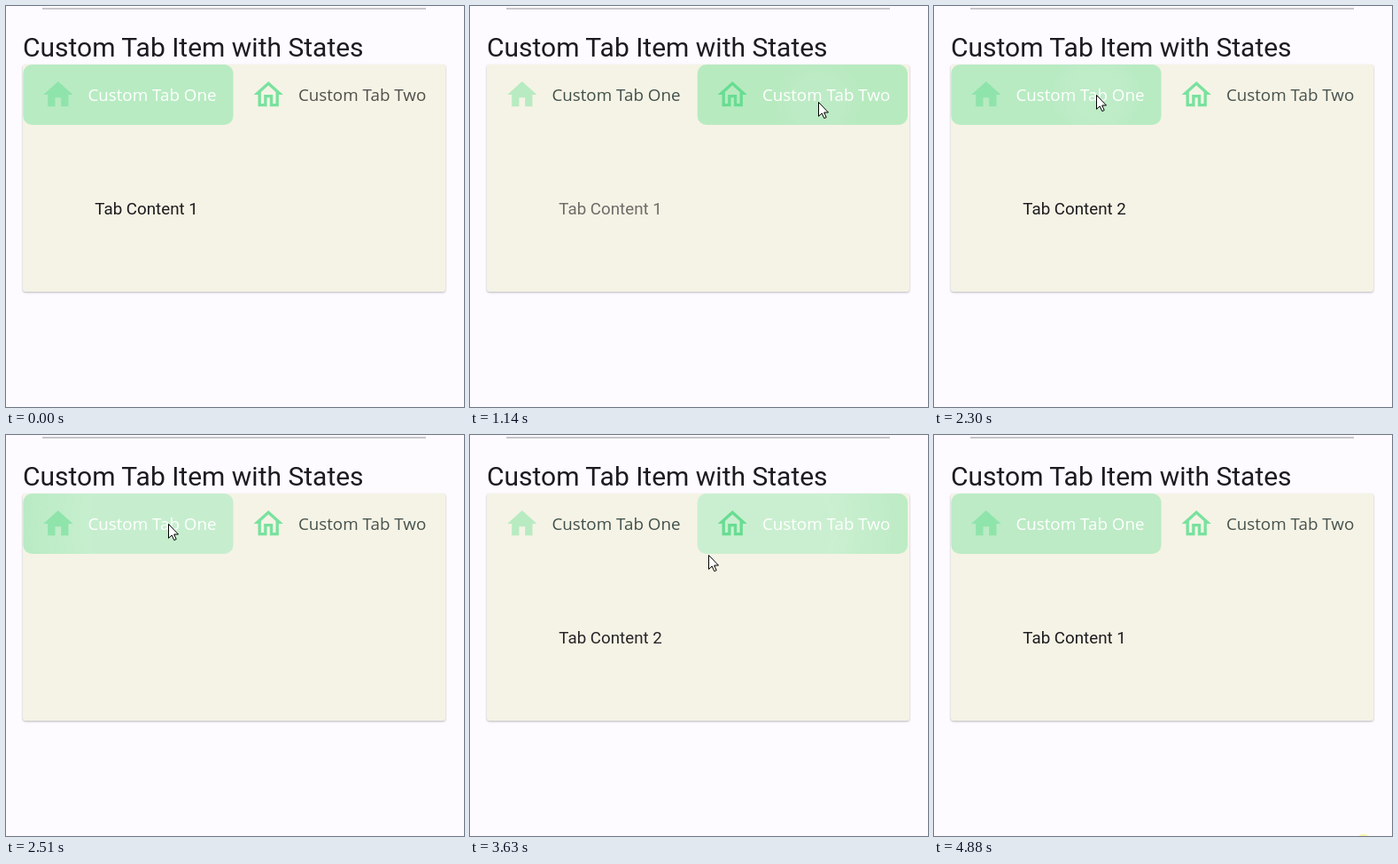
An HTML page that plays this animation: 517x452 px, repeating every 5020 ms.

```html
<!DOCTYPE html>
<html lang="en">
<head>
<meta charset="utf-8">
<title>Custom Tab Item with States</title>
<style>
html, body { margin: 0; width: 100%; height: 100%; overflow: hidden; background: #fdfbff; }
svg { display: block; width: 517px; height: 452px; }
svg * { animation: 5020ms linear infinite; }
.title { font: 30px Roboto, sans-serif; fill: #1c1b1f; }
.content { font: 18.75px Roboto, sans-serif; fill: #1c1b1f; }
.label { font: 18.8px "Open Sans", sans-serif; }
.card { fill: #f5f3e5; filter: drop-shadow(0 1.5px 1.2px rgba(0, 0, 0, .27)); }

/* Each ripple starts at its click time; the delay is click time minus loop length. */
.ripple { fill: url(#glow); transform-box: fill-box; transform-origin: center; animation-name: ripple; }

#bg1 { animation-name: bg1; }
#bg2 { animation-name: bg2; }
#icon1 { animation-name: icon1; }
#icon2 { animation-name: icon2; }
#label1 { animation-name: label1; }
#label2 { animation-name: label2; }
#content1 { animation-name: content1; }
#content2 { animation-name: content2; }
#cursor { animation-name: move; }
#pointer { animation-name: present; animation-timing-function: step-end; }
#halo { animation-name: halo; animation-timing-function: step-end; }

@keyframes ripple {
  0% { opacity: 0; transform: scale(.1); }
  2% { opacity: .6; }
  5.5% { opacity: 1; transform: scale(1); }
  8.3%, 100% { opacity: 0; transform: scale(1.2); }
}
@keyframes bg1 {
  0%, 18.73% { fill: #b8ebc2; }
  21.5%, 43.23% { fill: #b8ebc200; }
  45.5%, 66.7% { fill: #b8ebc2; }
  69.5%, 79.3% { fill: #b8ebc200; }
  82% { fill: #b8ebc2; }
  86.25%, 100% { fill: #bcebc5; }
}
@keyframes bg2 {
  0%, 18.73% { fill: #b8eac000; }
  21.5%, 24.1% { fill: #b8eac0; }
  28.09%, 43.23% { fill: #c2edc9; }
  45.5%, 66.7% { fill: #b8eac000; }
  69.5% { fill: #b8eac0; }
  72.31% { fill: #bdecc5; }
  75.1%, 79.3% { fill: #c2edc9; }
  82%, 100% { fill: #b8eac000; }
}
@keyframes icon1 {
  0%, 18.73% { fill: #8fe4ab; }
  21.5%, 43.23% { fill: #b8ebc1; }
  45.5%, 66.7% { fill: #8fe4ab; }
  69.5%, 79.3% { fill: #b8ebc1; }
  82%, 100% { fill: #8fe4ab; }
}
@keyframes icon2 {
  0%, 18.73% { fill: #78e29e; }
  21.5%, 43.23% { fill: #68dd92; }
  45.5%, 66.7% { fill: #78e29e; }
  69.5%, 79.3% { fill: #68dd92; }
  82%, 100% { fill: #78e29e; }
}
@keyframes label1 {
  0%, 18.73% { fill: #fff; }
  21.5%, 43.23% { fill: #40504c; }
  45.5%, 66.7% { fill: #fff; }
  69.5%, 79.3% { fill: #40504c; }
  82%, 100% { fill: #fff; }
}
@keyframes label2 {
  0%, 18.73% { fill: #4f4f4b; }
  21.5%, 43.23% { fill: #fff; }
  45.5%, 66.7% { fill: #46524e; }
  69.5%, 79.3% { fill: #fff; }
  82%, 100% { fill: #46524e; }
}
@keyframes content1 {
  0%, 21.5% { opacity: 1; }
  22.71% { opacity: .63; }
  24.6%, 50.9% { opacity: 0; }
  52.6%, 66.7% { opacity: 1; }
  69.5%, 86.8% { opacity: 0; }
  91.5%, 100% { opacity: 1; }
}
@keyframes content2 {
  0%, 24.6% { opacity: 0; }
  28.09%, 46.2% { opacity: 1; }
  49.4%, 69.7% { opacity: 0; }
  72.31% { opacity: .95; }
  73.5%, 83.3% { opacity: 1; }
  86.25%, 100% { opacity: 0; }
}
@keyframes move {
  0%, 7.77% { transform: translate(420px, 433px); }
  10.5% { transform: translate(401px, 310px); }
  13.4% { transform: translate(383px, 190px); }
  16% { transform: translate(388px, 118px); }
  17.33%, 25.5% { transform: translate(393px, 108px); }
  28.09% { transform: translate(370px, 172px); }
  29.48% { transform: translate(345px, 181px); }
  31% { transform: translate(311px, 175px); }
  33.6%, 34.5% { transform: translate(253px, 151px); }
  36.4% { transform: translate(197px, 108px); }
  37.8% { transform: translate(178px, 91px); }
  39.24%, 51% { transform: translate(183px, 100px); }
  52.79% { transform: translate(213px, 132px); }
  57% { transform: translate(253px, 145px); }
  60% { transform: translate(294px, 130px); }
  62.7% { transform: translate(317px, 98px); }
  64.14%, 69.5% { transform: translate(319px, 108px); }
  72.2%, 73.2% { transform: translate(269px, 135px); }
  75.1% { transform: translate(213px, 112px); }
  76.49%, 82% { transform: translate(200px, 100px); }
  84% { transform: translate(330px, 235px); }
  86.25% { transform: translate(503px, 393px); }
  87.65% { transform: translate(506px, 428px); }
  89%, 100% { transform: translate(500px, 460px); }
}
@keyframes present {
  0% { visibility: hidden; }
  7.75% { visibility: visible; }
  89%, 100% { visibility: hidden; }
}
@keyframes halo {
  0% { visibility: hidden; }
  97.2%, 100% { visibility: visible; }
}
</style>
</head>
<body>
<svg viewBox="0 0 517 452" width="517" height="452">
  <defs>
    <radialGradient id="glow">
      <stop offset=".5" stop-color="#fff" stop-opacity=".23"/>
      <stop offset="1" stop-color="#fff" stop-opacity="0"/>
    </radialGradient>
    <clipPath id="tab1"><rect x="19.3" y="66" width="237.2" height="68" rx="10"/></clipPath>
    <clipPath id="tab2"><rect x="256.7" y="66" width="237.3" height="68" rx="10"/></clipPath>
  </defs>

  <rect x="41" y="2" width="433" height="2" fill="#c8c5cc"/>
  <text class="title" x="19" y="57">Custom Tab Item with States</text>
  <rect class="card" x="19" y="66" width="477" height="256" rx="3"/>

  <g clip-path="url(#tab1)">
    <rect id="bg1" x="19" y="66" width="238" height="68"/>
    <circle class="ripple" cx="183" cy="100" r="175" style="animation-delay: -2790ms"/>
    <circle class="ripple" cx="200" cy="100" r="175" style="animation-delay: -1020ms"/>
  </g>
  <path id="icon1" transform="translate(38.8 80) scale(1.667)" d="M10 20v-6h4v6h5v-8h3L12 3 2 12h3v8z"/>
  <text id="label1" class="label" x="92.4" y="107">Custom Tab One</text>

  <g clip-path="url(#tab2)">
    <rect id="bg2" x="256" y="66" width="238" height="68"/>
    <circle class="ripple" cx="393" cy="108" r="175" style="animation-delay: -3940ms"/>
    <circle class="ripple" cx="319" cy="108" r="175" style="animation-delay: -1670ms"/>
  </g>
  <path id="icon2" transform="translate(276.2 80) scale(1.667)" d="M12 5.69l5 4.5V18h-2v-6H9v6H7v-7.81l5-4.5M12 3L2 12h3v8h6v-6h2v6h6v-8h3z"/>
  <text id="label2" class="label" x="329.9" y="107">Custom Tab Two</text>

  <text id="content1" class="content" x="100.3" y="235">Tab Content 1</text>
  <text id="content2" class="content" x="100.3" y="235">Tab Content 2</text>

  <circle id="halo" cx="485" cy="460" r="10" fill="#fbf5a2"/>
  <g id="cursor">
    <path id="pointer" d="M.5 .5V16.3L4.2 12.9 6.8 18.6 9.2 17.5 6.7 12H11.5z" fill="#fff" stroke="#000" stroke-linejoin="round"/>
  </g>
</svg>
</body>
</html>
```
